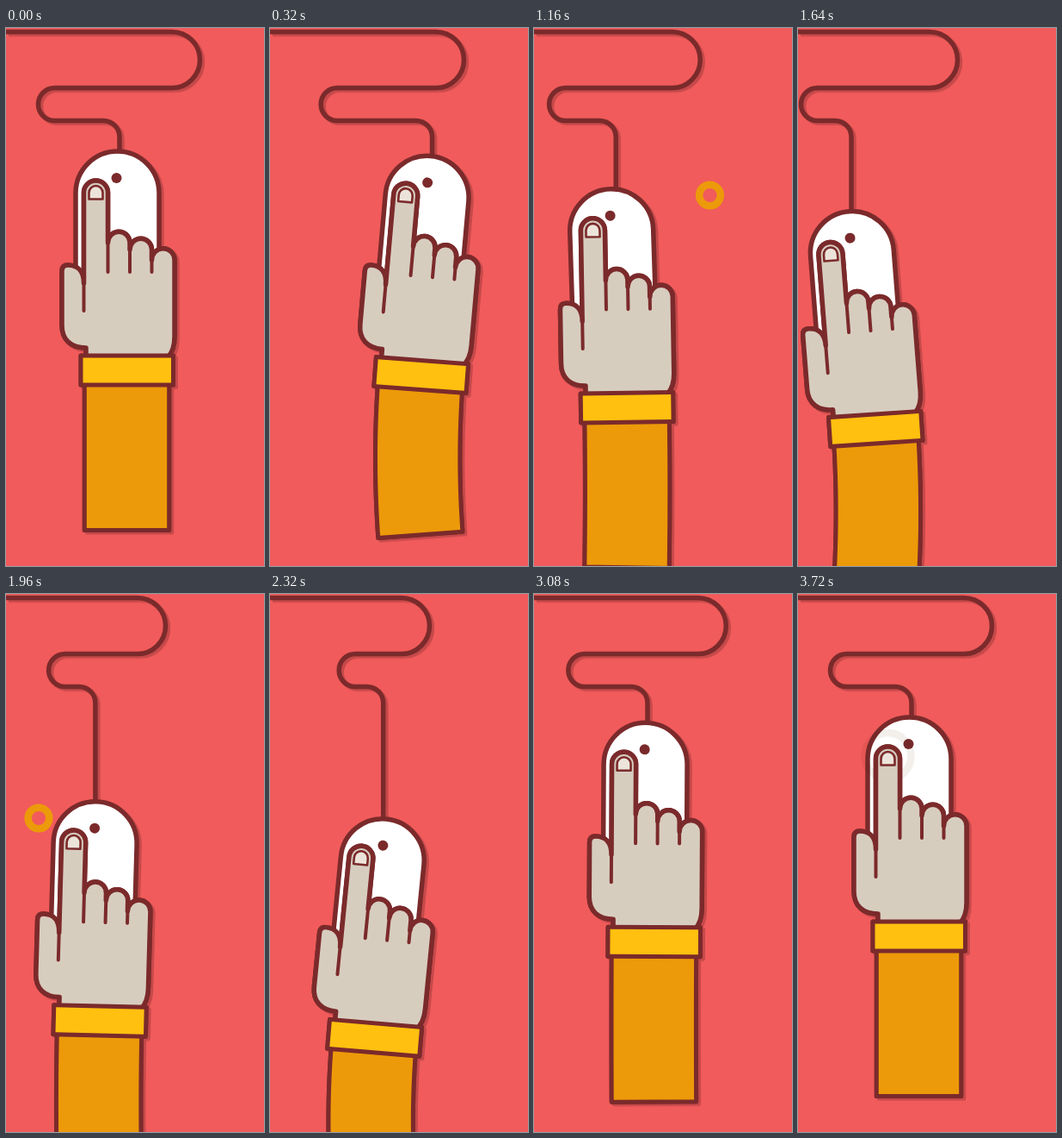
Recreate the animation shown at these times as an HTML page with a canvas. Size 300 px wide and 624 px high, loop 3.76 s.

```html
<!DOCTYPE html>
<html lang="en">
<head>
<meta charset="utf-8">
<title>Mouse hand</title>
<style>
html, body { margin: 0; width: 100%; height: 100%; overflow: hidden; background: #f15b5b; }
canvas { display: block; }
</style>
</head>
<body>
<canvas id="stage" width="300" height="624"></canvas>
<script>
const LOOP = 3760, W = 300, H = 624;
const RED = '#f15b5b', LINE = '#7b2a2b', SKIN = '#d7cdbf', ORANGE = '#ec9a09', YELLOW = '#ffc010';
const SHADOW = 'rgba(123,42,43,0.36)';
const PIVOT = { x: 140.5, y: 397 };
const CUFF_BEND = 0.85;

const view = document.getElementById('stage').getContext('2d');
const layer = document.createElement('canvas');
layer.width = W;
layer.height = H;
const paint = layer.getContext('2d');

// x, y: cuff centre; tilt, arm: angles of mouse and hand; right, left, end: bends of the cable.
const home = { x: 140.5, y: 397, tilt: 0, arm: 0, right: 225.5, left: 37.5, end: 132 };
// pace: exponents for parts that run ahead of or behind the move.
const moves = [
  { start: 60, time: 700, to: { x: 203.5, y: 407, tilt: 9.1, arm: 9.1, right: 225.5, left: 76.5, end: 234 } },
  { start: 782, time: 720, pace: { x: 0.8, y: 2.6, arm: 1.4 },
    to: { x: 90, y: 465, tilt: -4.5, arm: -4.5, right: 185.5, left: 3.5, end: 62 } },
  { start: 1690, time: 690, to: { x: 121.5, y: 515, tilt: 5.7, arm: 5.7, right: 185.5, left: 80.5, end: 132 } },
  { start: 2580, time: 700, to: home }
];
const rings = [
  { start: 1000, x: 204.5, y: 194, color: ORANGE },
  { start: 1800, x: 38, y: 260, color: ORANGE },
  { start: 2600, x: 106, y: 304, color: ORANGE },
  { start: 3380, x: 104.5, y: 188, color: SKIN, blend: 'multiply' }
];

const mouse = new Path2D('M81 310V191.500A48.500 48.500 0 0 1 178 191.500V310Z');
const hand = new Path2D('M93 382V371C76 371 65 362 65 345V282Q65 275 72 275C83 275 90.5 282 90.5 296' +
  'V191A14 14 0 0 1 118.5 191V249A12.75 12.75 0 0 1 144 249V257A12.75 12.75 0 0 1 169.5 257' +
  'V269A13.25 13.25 0 0 1 196 269V358Q196 374 188 382');
const creases = new Path2D('M90.5 290V328M118.5 245V283M144 249V283M169.5 257V283');
const nail = new Path2D('M96.5 198.5V191A8 8 0 0 1 112.5 191V198.5Z');
const cuff = new Path2D('M87 380H194.500V414H87Z');

const radians = degrees => degrees * Math.PI / 180;

// Cubic bezier (.4, 0, .2, 1), solved by bisection.
function ease(u) {
  let low = 0, high = 1, s = 0.5;
  for (let i = 0; i < 18; i++) {
    s = (low + high) / 2;
    const x = 1.2 * (1 - s) * (1 - s) * s + 0.6 * (1 - s) * s * s + s * s * s;
    if (x < u) low = s; else high = s;
  }
  return 3 * (1 - s) * s * s + s * s * s;
}

function poseAt(t) {
  let from = home;
  for (const { start, time, pace = {}, to } of moves) {
    if (t <= start) return from;
    if (t < start + time) {
      const p = ease((t - start) / time), pose = {};
      for (const key in to) {
        pose[key] = from[key] + (to[key] - from[key]) * Math.pow(p, pace[key] || 1);
      }
      return pose;
    }
    from = to;
  }
  return from;
}

function shape(c, path, fill, width) {
  if (fill) {
    c.fillStyle = fill;
    c.fill(path);
  }
  c.lineWidth = width;
  c.stroke(path);
}

function withTilt(c, { x, y }, angle, draw) {
  c.save();
  c.translate(x, y);
  c.rotate(radians(angle));
  c.translate(-PIVOT.x, -PIVOT.y);
  draw();
  c.restore();
}

function drawCable(c, { right, left, end, y }) {
  c.lineWidth = 5.5;
  c.beginPath();
  c.moveTo(-5, 4.5);
  c.arc(right - 32.5, 37, 32.5, -Math.PI / 2, Math.PI / 2);
  c.arc(left + 19, 88.5, 19, -Math.PI / 2, Math.PI / 2, true);
  c.arc(end - 19, 126.5, 19, -Math.PI / 2, 0);
  c.lineTo(end, y - 230);
  c.stroke();
}

function drawMouse(c, pose) {
  withTilt(c, pose, pose.tilt, () => {
    shape(c, mouse, '#fff', 5.5);
    c.fillStyle = LINE;
    c.beginPath();
    c.arc(128.5, 174, 6, 0, Math.PI * 2);
    c.fill();
  });
}

// The sleeve bends evenly from the cuff's angle to the opposite one.
function drawSleeve(c, pose) {
  const steps = 24, length = 185.5, half = 49.2;
  const bend = radians(pose.arm * CUFF_BEND);
  const near = [], far = [];
  let { x, y } = pose;
  for (let i = 0; i <= steps; i++) {
    const a = bend * (1 - 2 * i / steps);
    near.push([x - half * Math.cos(a), y - half * Math.sin(a)]);
    far.unshift([x + half * Math.cos(a), y + half * Math.sin(a)]);
    x -= Math.sin(a) * length / steps;
    y += Math.cos(a) * length / steps;
  }
  const path = new Path2D();
  near.concat(far).forEach(p => path.lineTo(...p));
  path.closePath();
  shape(c, path, ORANGE, 5);
}

function drawArm(c, pose) {
  withTilt(c, pose, pose.arm, () => {
    shape(c, hand, SKIN, 5.5);
    shape(c, creases, null, 4);
    shape(c, nail, '#ece4da', 2.6);
  });
  drawSleeve(c, pose);
  withTilt(c, pose, pose.arm * CUFF_BEND, () => shape(c, cuff, YELLOW, 5));
}

function drawRing(c, t, { start, x, y, color, blend = 'source-over' }) {
  const u = (t - start) / 400;
  if (u <= 0 || u >= 1) return;
  const outer = 34 * (1 - Math.pow(1 - u, 1.3));
  const width = Math.min(8.5, outer);
  c.save();
  c.globalCompositeOperation = blend;
  c.globalAlpha = Math.min(1, (1 - u) * 2);
  c.strokeStyle = color;
  c.lineWidth = width;
  c.beginPath();
  c.arc(x, y, outer - width / 2, 0, Math.PI * 2);
  c.stroke();
  c.restore();
}

function render(t) {
  const pose = poseAt(t);
  paint.clearRect(0, 0, W, H);
  drawCable(paint, pose);
  drawMouse(paint, pose);
  drawArm(paint, pose);

  view.fillStyle = RED;
  view.fillRect(0, 0, W, H);
  view.save();
  view.shadowColor = SHADOW;
  view.shadowOffsetX = 3;
  view.shadowOffsetY = 2.5;
  view.drawImage(layer, 0, 0);
  view.restore();
  rings.forEach(ring => drawRing(view, t, ring));
  drawArm(view, pose);
}

for (const c of [paint, view]) {
  c.strokeStyle = LINE;
  c.lineCap = c.lineJoin = 'round';
}

const begin = performance.now();
function tick() {
  render((performance.now() - begin) % LOOP);
  requestAnimationFrame(tick);
}
tick();
</script>
</body>
</html>
```
